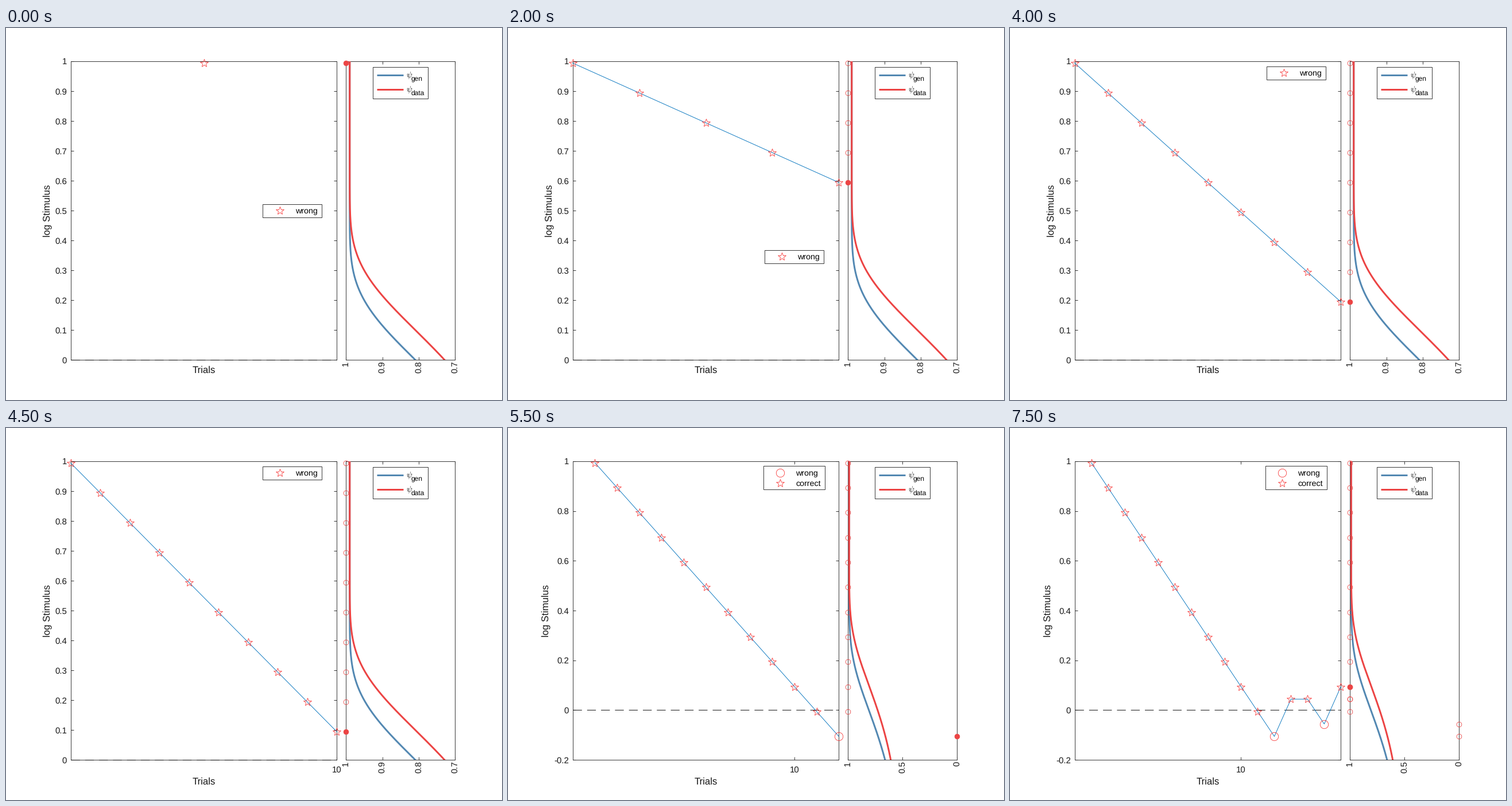
These frames come from a looping animation (864 by 648 pixels, 8 s). A matplotlib script:

```python
import numpy as np
import matplotlib.pyplot as plt
from matplotlib.animation import FuncAnimation
from matplotlib.patches import Rectangle

W, H = 864, 648
INK, RED, BLUE, STAR = "#262626", "#ec4444", "#5388b2", "#f83232"
TEXT = "#161616"

plt.rcParams.update({
    "font.family": "Liberation Sans",
    "mathtext.fontset": "cm",
    "text.hinting": "none",
    "axes.linewidth": 0.9,
    "axes.edgecolor": INK,
    "axes.unicode_minus": False,
})

# Staircase: eleven steps down, a miss, then small corrections.
level = np.concatenate([0.994 - 0.1 * np.arange(12), [0.044, 0.044, -0.056, 0.094]])
correct = np.ones(len(level), bool)
correct[[11, 14]] = False
trial = np.arange(1, len(level) + 1)

# dpi 72 makes one point equal one pixel
fig = plt.figure(figsize=(W / 72, H / 72), dpi=72, facecolor="white")


def panel(x0, x1):
    ax = fig.add_axes([x0 / W, 70 / H, (x1 - x0) / W, 520 / H], facecolor="none")
    ax.tick_params(direction="in", top=True, right=True, length=5, width=0.9,
                   color=INK, labelcolor=TEXT, labelsize=15)
    return ax


left = panel(112.8, 576.3)
right = panel(592.4, 782.3)
left.tick_params(axis="y", pad=7)
left.tick_params(axis="x", pad=11)
right.tick_params(axis="x", pad=2.5, labelrotation=90)
right.set_yticks([])

page = fig.add_axes([0, 0, 1, 1], facecolor="none", zorder=5)
page.set(xlim=(0, W), ylim=(H, 0))
page.axis("off")


def marks(ax, shape, size, fill="none", color=STAR):
    return ax.plot([], [], shape, ms=size, mfc=fill, mec=color, mew=0.8,
                   clip_on=False, zorder=4)[0]


def label(x, y, text, size, color="black", **kw):
    kw = {"va": "center_baseline", **kw}
    return page.text(x, y, text, fontsize=size, color=color, **kw)


def frame(x, y, w, h):
    box = Rectangle((x, y), w, h, fc="white", ec=INK, lw=0.9)
    return page.add_patch(box)


def psi(x, threshold):
    return 0.5 + 0.49 * (1 - np.exp(-10 ** (2 * (x - threshold))))


# Left panel
left.plot([0, 1], [0, 0], color="black", lw=0.9, dashes=(17, 10),
          transform=left.get_yaxis_transform(), clip_on=False, zorder=2.8)
path, = left.plot([], [], color="#0072bd", lw=0.9, clip_on=False, zorder=3)
stars = marks(left, "*", 14.6)
rings = marks(left, "o", 14.4)
xlabel = label(344.5, 596, "Trials", 16.7, TEXT, ha="center", va="center")
ylabel = label(72.5, 318, "log Stimulus", 16.7, TEXT, ha="center", va="center",
               rotation=90)

# Right panel
s = np.linspace(-0.25, 1.05, 400)
for color, threshold in ((BLUE, 0), (RED, 0.1)):
    right.plot(psi(s, threshold), s, color=color, lw=3, zorder=3)
past = marks(right, "o", 8.7, color=RED)
now = marks(right, "o", 8.7, RED, RED)

frame(639.4, 68, 95.6, 55)
for y, color, name in ((82, BLUE, "gen"), (107, RED, "data")):
    page.plot([646, 692], [y, y], color=color, lw=3, solid_capstyle="butt")
    label(697, y + 0.5, r"$\psi$", 14.5, va="center")
    label(705.5, y + 9.5, name, 12, va="baseline")

# Marker legend, moved to wherever there is room
key_box = frame(447, 306, 103, 23)
key_star = marks(page, "*", 14.6)
key_ring = marks(page, "o", 14.4)
key_one = label(504, 318, "wrong", 14.2)
key_two = label(501.5, 96, "correct", 14.2)


def place_key(n):
    both = n > 11
    y = [318, 318, 358, 398, 398, 438][n - 1] if n < 7 else 78
    if both:
        key_box.set_bounds(445, 66, 107, 41)
        key_star.set_data([474], [96])
        key_ring.set_data([474], [78])
    else:
        key_box.set_bounds(447, y - 11, 103, 23)
        key_star.set_data([476.5], [y])
        key_ring.set_data([], [])
    key_one.set_position((501.5 if both else 504, y))
    key_two.set_visible(both)


def x_range(n):
    if n == 1:
        return 0, 2
    if n <= 10:
        return 1, n
    return 0, n + n % 2 if n < 15 else n


def update(i):
    n = i + 1
    x, y, ok = trial[:n], level[:n], correct[:n]
    low = -0.2 if n > 10 else 0
    step = 0.2 if n > 10 else 0.1
    ticks = np.round(np.arange(low, 1 + step / 2, step), 1) + 0.0

    left.set(xlim=x_range(n), ylim=(low, 1))
    left.set_xticks([10] if n >= 10 else [])
    left.set_yticks(ticks, [f"{t:g}" for t in ticks])
    path.set_data(x, y)
    stars.set_data(x[ok], y[ok])
    rings.set_data(x[~ok], y[~ok])
    xlabel.set_y(616.5 if n >= 10 else 596)
    ylabel.set_x(66 if n > 10 else 72.5)

    if n > 11:
        probs = [1, 0.5, 0]
    elif n > 10:
        probs = [1, 0.8, 0.6]
    else:
        probs = [1, 0.9, 0.8, 0.7]
    right.set_xticks(probs, [f"{p:g}" for p in probs])
    right.set(xlim=(1, probs[-1]), ylim=(low, 1))
    past.set_data(ok[:-1].astype(float), y[:-1])
    now.set_data([float(ok[-1])], [y[-1]])
    place_key(n)


anim = FuncAnimation(fig, update, frames=len(level), interval=500,
                     repeat=True, repeat_delay=0, blit=False)
plt.show()
```
